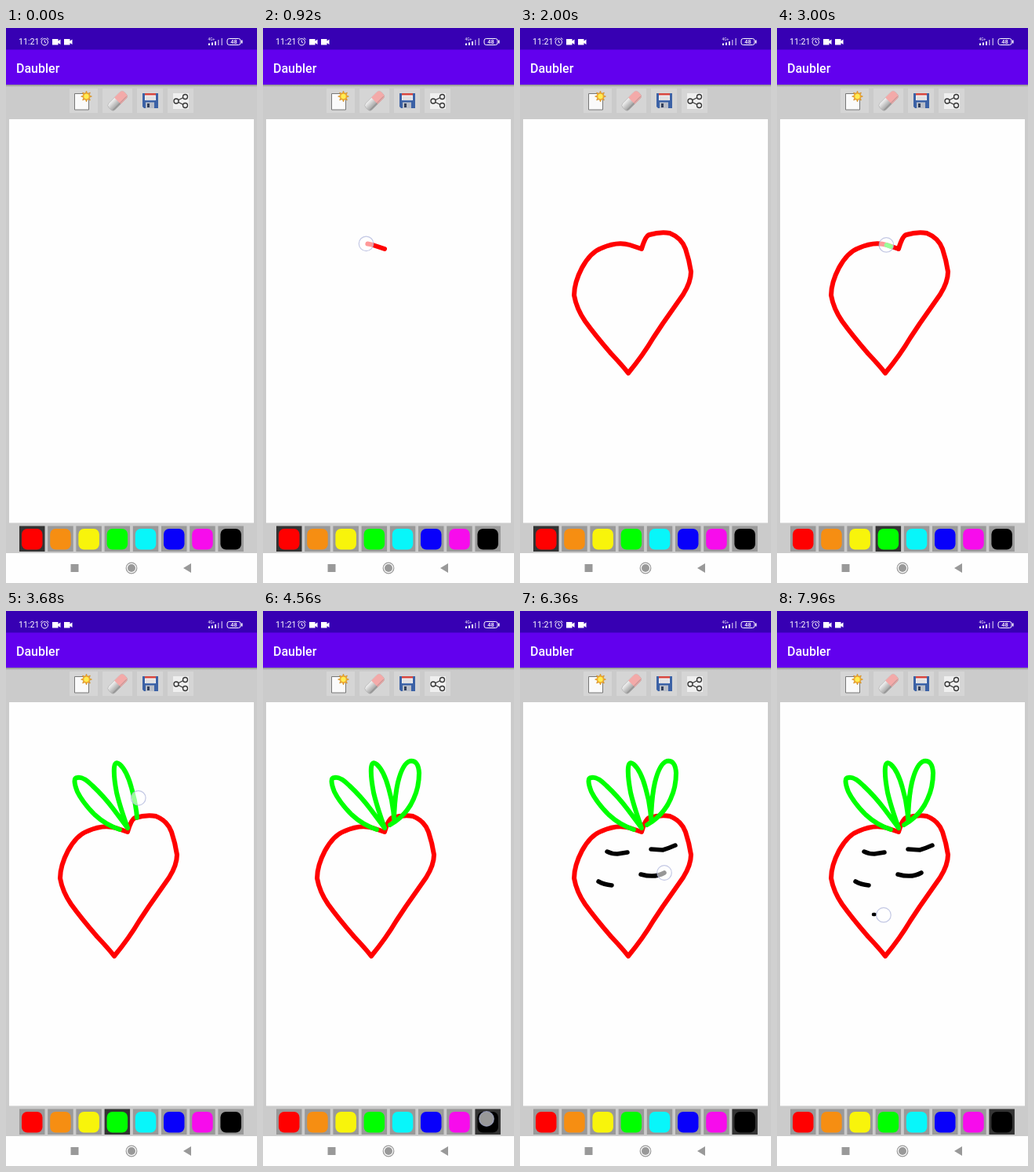
An HTML page that plays this animation: 320 px wide and 706 px high, repeating every 8 s.

```html
<!DOCTYPE html>
<html lang="en">
<head>
<meta charset="utf-8">
<title>Daubler</title>
<style>
html, body { margin: 0; width: 100%; height: 100%; overflow: hidden; }
svg { display: block; width: 320px; height: 706px; font-family: Roboto, sans-serif; }
#strokes path { fill: none; stroke-linecap: round; stroke-linejoin: round; }
</style>
</head>
<body>
<svg viewBox="0 0 320 706">
  <defs>
    <linearGradient id="shade" x2="0" y2="1">
      <stop stop-color="#8a8a8a"/><stop offset="1" stop-color="#cbcbcb"/>
    </linearGradient>
    <linearGradient id="rubber" x2="0" y2="1">
      <stop stop-color="#f4f4f4"/><stop offset="1" stop-color="#999"/>
    </linearGradient>
  </defs>
  <rect width="320" height="706" fill="#cbcbcb"/>
  <rect width="320" height="28" fill="#3700b3"/>
  <rect y="27.5" width="320" height="45" fill="#6200ee"/>
  <rect y="72" width="320" height="3" fill="url(#shade)"/>
  <text x="13" y="56.5" font-size="16" font-weight="500" fill="#fff">Daubler</text>

  <!-- status bar -->
  <g fill="#fff">
    <text x="16" y="21.3" font-size="10.6">11:21</text>
    <g fill="none" stroke="#fff">
      <circle cx="49.3" cy="17.8" r="4.2"/>
      <path d="M49.3 15.5v2.5l1.8 1M44 14.5l2.5-2M54.5 14.5l-2.5-2"/>
      <rect x="282" y="13.5" width="17" height="8" rx="2.5"/>
    </g>
    <path id="cam" d="M59 14h7.5v2.5l3-2v6.500l-3-2V21.500H59z"/>
    <use href="#cam" x="15"/>
    <rect x="300" y="15.500" width="1.500" height="4"/>
    <text x="290.500" y="20.300" font-size="7.500" font-weight="500" text-anchor="middle">48</text>
    <text x="257.500" y="15.500" font-size="4.800">4G+</text>
    <path d="M258 19.500h2V22h-2zM262 18.500h2V22h-2zM266 17h2v5h-2z"/>
    <path d="M270 15h1.500v7H270zM274.500 13h1.500v9h-1.500z" opacity=".6"/>
  </g>

  <!-- toolbar -->
  <path fill="#d5d5d5" d="M81 77h36v31H81zM123 77h38v31h-38zM167 77h33v31h-33zM206 77h33v31h-33z"/>
  <path d="M87.500 83.500h18v20.500h-18z" fill="#fafafa" stroke="#777"/>
  <polygon id="star" fill="#f2a72b" stroke="#c98518" stroke-width=".5"/>
  <circle cx="102.500" cy="87" r="3.200" fill="#ffec52"/>
  <g transform="translate(142 92.500) rotate(-45)">
    <rect x="-14" y="-5.500" width="28" height="11.500" rx="4" fill="url(#rubber)" stroke="#aaa" stroke-width=".6"/>
    <path d="M0-5.500h10q4 0 4 4v3.500q0 4-4 4H0z" fill="#f3aaa9"/>
    <path d="M-12 4.500H12" stroke="#777" opacity=".4"/>
  </g>
  <path d="M174 83h20v19h-18l-2-2z" fill="#3c62a6"/>
  <path d="M177 83h14v9h-14z" fill="#f1f1f4"/>
  <path d="M177 83h14v2.500h-14z" fill="#d8473f"/>
  <path d="M178 88h12M178 90.500h12" stroke="#bbb" stroke-width=".7"/>
  <path d="M178 94.500h11V102h-11z" fill="#b9bec8"/>
  <path d="M180 96h3v5h-3z" fill="#333f5c"/>
  <path d="M213 83h20v20h-20z" fill="#efefef"/>
  <g fill="#efefef" stroke="#333" stroke-width="1.300">
    <path d="M217 93l11-5.500M217 93l11 5.500"/>
    <circle cx="217" cy="93" r="3"/><circle cx="228.500" cy="87.500" r="3"/><circle cx="228.500" cy="98.500" r="3"/>
  </g>

  <rect x="4" y="116" width="312" height="513.500" fill="#fefefe"/>
  <g id="strokes"></g>
  <g id="palette"></g>

  <!-- navigation bar -->
  <rect y="668" width="320" height="38" fill="#fefefe"/>
  <g fill="#999">
    <path d="M82.500 682h10v10h-10zM226 687l10-6v12z"/>
    <circle cx="160" cy="687" r="5"/>
    <circle cx="160" cy="687" r="6.800" fill="none" stroke="#999" stroke-width="1.200"/>
  </g>
  <circle id="touch" r="9.300" fill="#fff" fill-opacity=".6" stroke="#aab0d8" stroke-opacity=".7" stroke-width="1.200"/>
</svg>
<script>
const LOOP = 8000, FADE = 90;
const $ = id => document.getElementById(id);

function add(parent, tag, attrs) {
  const el = document.createElementNS('http://www.w3.org/2000/svg', tag);
  for (const key in attrs) el.setAttribute(key, attrs[key]);
  return parent.appendChild(el);
}

$('star').setAttribute('points', Array.from({length: 16}, (_, i) => {
  const r = i % 2 ? 4 : 7, a = i * Math.PI / 8;
  return [102.5 + r * Math.cos(a), 87 + r * Math.sin(a)];
}).join(' '));

const colors = ['#f00', '#f68e12', '#f8f40b', '#0f0', '#08f6fa', '#0800fa', '#f70cec', '#000'];
const buttons = colors.map((fill, i) => {
  const x = 17 + i * 36.2;
  const frame = add($('palette'), 'rect', {x, y: 633.5, width: 32.5, height: 32.5});
  add($('palette'), 'rect', {x: x + 3, y: 637, width: 26.5, height: 26.5, rx: 7, fill});
  return frame;
});

// lead: how far the finger runs ahead of the ink, relative to the inked length
const stroke = (color, width, start, end, d, lead = .08) => {
  const path = add($('strokes'), 'path', {d, stroke: color, 'stroke-width': width});
  return {path, start, end, lead, length: path.getTotalLength()};
};
const strokes = [
  stroke('#f00', 6, 880, 1800, 'M155 281L140 276Q124 271 104 280Q90 285 79 305Q69 324 69 340Q72 357 83 373Q96 391 116 414Q132 431 138 439Q157 416 170 394L182 376L208 339Q218 323 218 310Q216 296 211 281Q206 267 191 261Q179 259 165 263Q160 264 155 281'),
  stroke('#0f0', 6, 2990, 4040, 'M145 278Q127 272 113 259Q98 244 91 230Q84 212 91 212Q98 210 110 222Q125 236 137 252L155 276Q145 248 141 231Q137 210 138 199Q139 190 145 195Q154 203 160 225Q166 245 167 264Q168 235 172 218Q178 194 187 191Q198 189 199 206Q199 224 192 239Q183 260 162 272'),
  stroke('#000', 5.5, 4880, 5120, 'M111 306Q117 309 124 309L137 307'),
  stroke('#000', 5.5, 5360, 5600, 'M167 303L182 304Q189 302 198 298'),
  stroke('#000', 5.5, 5740, 5920, 'M100 344Q107 348 117 349'),
  stroke('#000', 5.5, 6140, 6360, 'M154 335Q172 340 184 333'),
  stroke('#000', 4.5, 7940, 8200, 'M123 386L143 387', 7)
];
const taps = [
  {start: 2280, end: 2440, x: 142, y: 648, pick: 3},
  {start: 4460, end: 4600, x: 285, y: 646, pick: 7}
];

function draw(t) {
  let selected = 0, finger = null;
  for (const s of strokes) {
    const p = Math.min(1, (t - s.start) / (s.end - s.start));
    s.path.style.display = p < 0 ? 'none' : '';
    if (p < 0) continue;
    s.path.setAttribute('stroke-dasharray', p < 1 ? `${p * s.length} 9999` : 'none');
    if (t < s.end + FADE) {
      const {x, y} = s.path.getPointAtLength(s.length * Math.min(1, p * (1 + s.lead)));
      finger = {x, y, end: s.end};
    }
  }
  for (const tap of taps) {
    if (t >= tap.start + 60) selected = tap.pick;
    if (t >= tap.start && t < tap.end + FADE) finger = tap;
  }
  buttons.forEach((b, i) => b.setAttribute('fill', i === selected ? '#333' : '#999'));

  const touch = $('touch');
  touch.style.display = finger ? '' : 'none';
  if (finger) {
    touch.setAttribute('cx', finger.x);
    touch.setAttribute('cy', finger.y);
    touch.setAttribute('opacity', Math.min(1, 1 - (t - finger.end) / FADE));
  }
}

function tick() {
  draw(performance.now() % LOOP);
  requestAnimationFrame(tick);
}
tick();
</script>
</body>
</html>
```
